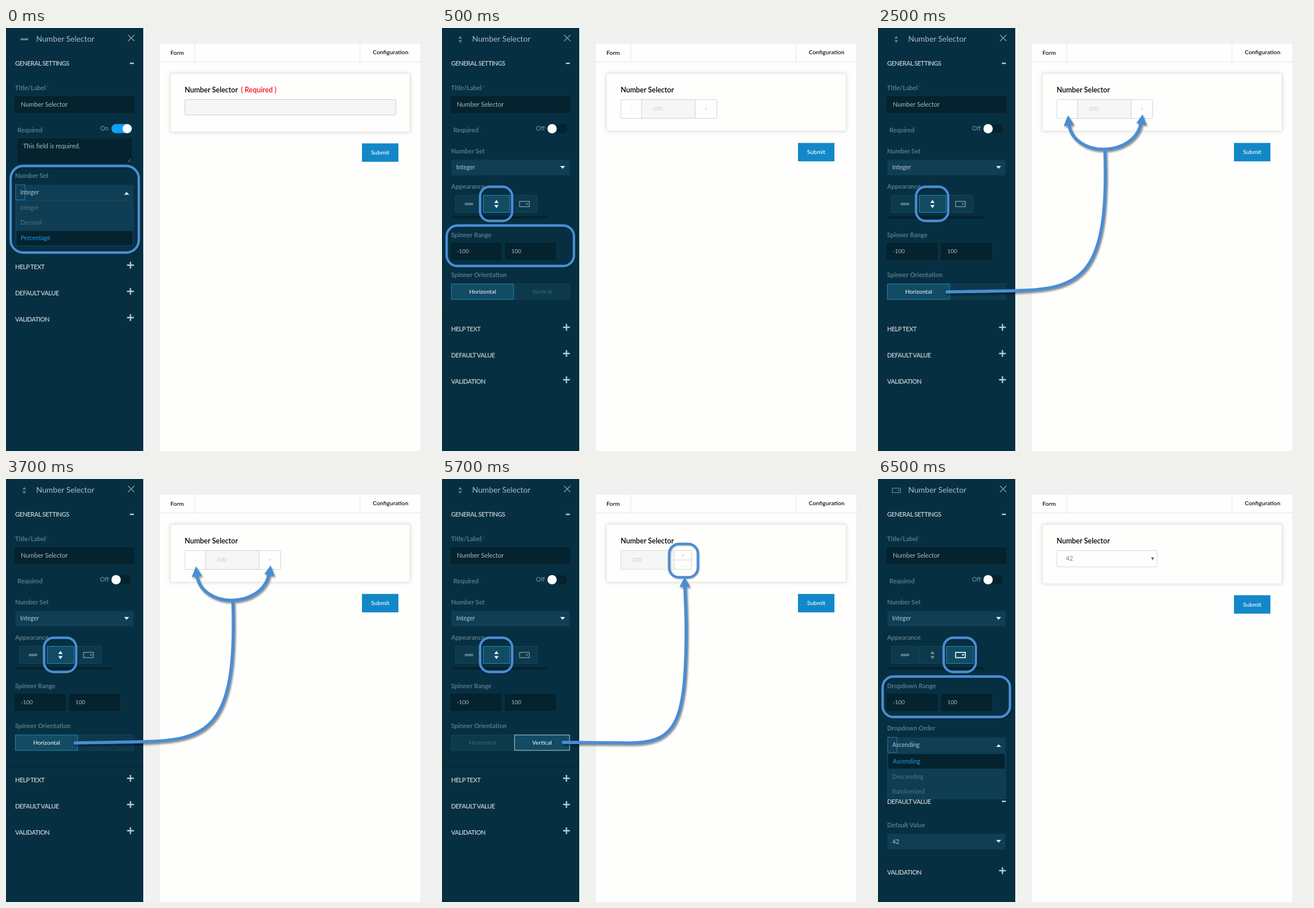
Animation of 755x742 px, one loop 8 s. Source, as an HTML page:

```html
<!DOCTYPE html>
<html lang="en">
<head>
<meta charset="utf-8">
<title>Number selector settings</title>
<style>
html, body { margin: 0; width: 100%; height: 100%; overflow: hidden; background: #f0f2f0; }
svg { display: block; width: 755px; height: 742px; font-family: Lato, "Open Sans", sans-serif; font-size: 10.6px; }
text { white-space: pre; }

/* Scenes: hard cuts at 500, 2500, 4500 and 6500 ms */
.list, .spin, .horiz, .vert, .drop, .range, .path, .later, .early { animation: 8s step-end infinite; visibility: hidden; }
.list { animation-name: list; }
.spin { animation-name: spin; }
.horiz { animation-name: horiz; }
.vert { animation-name: vert; }
.drop { animation-name: drop; }
.range { animation-name: range; }
.path { animation-name: path; }
.later { animation-name: later; }
@keyframes list { 0% { visibility: visible } 6.25%, 100% { visibility: hidden } }
@keyframes spin { 0% { visibility: hidden } 6.25% { visibility: visible } 81.25%, 100% { visibility: hidden } }
@keyframes horiz { 0% { visibility: hidden } 6.25% { visibility: visible } 56.25%, 100% { visibility: hidden } }
@keyframes vert { 0% { visibility: hidden } 56.25% { visibility: visible } 81.25%, 100% { visibility: hidden } }
@keyframes drop { 0% { visibility: hidden } 81.25%, 100% { visibility: visible } }
@keyframes range { 0% { visibility: hidden } 6.25% { visibility: visible } 31.25% { visibility: hidden } 81.25%, 100% { visibility: visible } }
@keyframes path { 0% { visibility: hidden } 31.25% { visibility: visible } 56.25%, 100% { visibility: hidden } }
@keyframes later { 0% { visibility: hidden } 6.25%, 100% { visibility: visible } }

.title { font-size: 13.8px; fill: #a9bcc4; }
.head { font-size: 11px; font-weight: 600; letter-spacing: -.5px; fill: #c3ced3; }
.label { font-size: 11.1px; font-weight: 700; fill: #587987; }
.value { font-size: 11.1px; fill: #a9bac1; }
.num { font-size: 10px; fill: #a9bac1; }
.pick { fill: #b4c7cf; }
.dim { fill: #4d7686; }
.hot { fill: #1b9df3; }
.tab { font-size: 10.3px; fill: #fff; text-anchor: middle; }
.tab.off { fill: #41697a; }
.form { font-size: 10.3px; font-weight: 600; fill: #111; }
.name { font-size: 12.5px; font-weight: 600; fill: #000; }
.submit { font-size: 10.4px; font-weight: 500; fill: #fff; }
.faint { font-size: 9.8px; fill: #c6cccb; }
.mid { text-anchor: middle; }

.field { fill: #04232e; stroke: #031d27; }
.select { fill: #103e54; stroke: #0b364a; }
.cell { fill: #0d394d; stroke: #164459; }
.on { fill: #124b64; stroke: #2686af; }
.rule { stroke: #042532; fill: none; }
.card { fill: #fefefd; stroke: #ebedec; filter: drop-shadow(0 0 3px rgba(0,0,0,.17)); }
.box { fill: #fefefd; stroke: #d3d6d5; }
.grey { fill: #f5f7f6; stroke: #d9dcdb; }
.blue { fill: #1388c8; }
.caret { fill: none; stroke: #2a78ae; }
.mark { fill: none; stroke: #4a8dd5; stroke-width: 4.3; filter: drop-shadow(1.5px 1.5px 1.2px rgba(0,0,0,.3)); }
.flow { fill: none; stroke: #4a8dd5; stroke-width: 5.6; stroke-linecap: round; filter: drop-shadow(2.5px 3px 1.5px rgba(0,0,0,.42)); }
.flow .tip { fill: #4a8dd5; stroke: none; }
</style>
</head>
<body>
<svg viewBox="0 0 755 742">
  <defs>
    <path id="plus" d="M-6 0H6M0-6V6" stroke="#bccbd2" stroke-width="2.3"/>
    <path id="minus" d="M-3.5 0H3.5" stroke="#c3ced3" stroke-width="2.4"/>
    <path id="down" d="M-4.5-2.2H4.5L0 2.6Z"/>
    <path id="up" d="M-4.5 2.4H4.5L0-2.4Z"/>
    <path id="dash" d="M-7.5-2H7.5V2.2H-7.5Z"/>
    <path id="updown" d="M0-7.2L3.9-1.8H-3.9ZM0 7.2L3.9 1.8H-3.9Z"/>
    <g id="menu">
      <rect x="-8.5" y="-4.6" width="17" height="9.2" fill="none" stroke="currentColor" stroke-width="1.6"/>
      <path d="M2-1.3H7L4.5 1.7Z" fill="currentColor"/>
    </g>
    <g id="tail">
      <path class="rule" d="M0 .5H241"/>
      <text class="head" x="16" y="27">HELP TEXT</text><use href="#plus" x="218.5" y="20"/>
      <text class="head" x="16" y="72.7">DEFAULT VALUE</text><use href="#plus" x="218.5" y="66"/>
      <text class="head" x="16" y="118.5">VALIDATION</text><use href="#plus" x="218.5" y="112"/>
    </g>
    <g id="submit">
      <rect class="blue" x="625" width="64" height="32.3"/>
      <text class="submit mid" x="657" y="19.7">Submit</text>
    </g>
  </defs>

  <!-- Form page -->
  <rect width="755" height="742" fill="#f0f2f0"/>
  <path d="M269.5 750V26.5H728.5V750Z" fill="#fefefd" stroke="#e8eae9"/>
  <path d="M270 59.5H728M331.5 27V59M621.5 27V59" stroke="#e2e5e4"/>
  <text class="form" x="288.7" y="46.7">Form</text>
  <text class="form" x="644" y="46.3">Configuration</text>

  <g class="list">
    <rect class="card" x="289" y="80" width="420" height="102"/>
    <rect class="grey" x="314" y="125.5" width="370.5" height="27" rx="2" style="stroke:#c9cdcc"/>
    <text class="name" x="412.5" y="113.3" style="fill:#f01018">( Required )</text>
    <use href="#submit" y="202.4"/>
  </g>

  <g class="spin">
    <rect class="card" x="289" y="80" width="420" height="100.5"/>
    <use href="#submit" y="201.6"/>
  </g>
  <g class="horiz">
    <rect class="box" x="314" y="125.5" width="168.5" height="33" rx="2"/>
    <rect class="grey" x="350.5" y="125.5" width="94" height="33" style="stroke:#cfd3d2"/>
    <text class="faint mid" x="332" y="145.3">-</text>
    <text class="faint" x="367" y="145.3">-100</text>
    <text class="faint mid" x="463.7" y="145.3">+</text>
  </g>
  <g class="vert">
    <rect class="grey" x="314" y="125.5" width="124.5" height="33" rx="2"/>
    <path class="box" d="M407.5 125.5H438.5V158.5H407.5ZM407.5 142H438.5"/>
    <text class="faint" x="330" y="145.3">-100</text>
    <text class="faint mid" x="423" y="137">+</text>
    <text class="faint mid" x="423" y="154.5">-</text>
  </g>

  <g class="drop">
    <rect class="card" x="289" y="80" width="420" height="103.5"/>
    <rect class="box" x="314" y="125.5" width="176" height="28.5" rx="2"/>
    <text x="330" y="143.3" fill="#777b7a">42</text>
    <path d="M479.5 137.3H484.7L482.1 142.7Z" fill="#606463"/>
    <use href="#submit" y="203.9"/>
  </g>
  <text class="name" x="313.7" y="113.3">Number Selector</text>

  <!-- Settings panel -->
  <rect width="241" height="742" fill="#063042"/>
  <text class="title" x="53" y="24.4">Number Selector</text>
  <path d="M214.3 12L225.4 23M225.4 12L214.3 23" stroke="#7f979f" stroke-width="1.5"/>
  <text class="head" x="16" y="66.3">GENERAL SETTINGS</text>
  <use href="#minus" x="221" y="62"/>
  <text class="label" x="16" y="108.8">Title/Label</text>
  <text x="71" y="108" font-size="10" fill="#b5222f">*</text>
  <rect class="field" x="16" y="120.5" width="208.5" height="28" rx="1"/>
  <text class="value" x="26" y="137.6">Number Selector</text>
  <text class="label" x="20" y="182.8">Required</text>

  <g class="list">
    <path d="M25.5 18H39V21.5H25.5Z" fill="#68828d"/>
    <text x="165.5" y="180" font-size="10.8" fill="#7895a1">On</text>
    <rect x="185" y="168.5" width="36" height="16" rx="8" fill="#119ff7"/>
    <circle cx="212.7" cy="176.6" r="8" fill="#fff"/>
    <rect class="field" x="20.5" y="194.5" width="200" height="42"/>
    <text class="value" x="30" y="211.4">This field is required.</text>
    <path d="M213.5 235.5L219 230M217 235.5L219 233.5" stroke="#8ba0a8"/>
    <text class="label" x="16" y="263">Number Set</text>
    <rect class="select" x="16.5" y="275" width="207.5" height="27.5"/>
    <rect class="caret" x="17" y="275" width="16" height="26.5"/>
    <text class="pick" x="25" y="291.8">Integer</text>
    <use href="#up" x="211.8" y="290" fill="#dbe7ec"/>
    <use href="#tail" y="396"/>
    <rect x="17.5" y="303" width="205.5" height="79" fill="#0f3d53" stroke="#174f69"/>
    <text class="dim" x="25" y="319">Integer</text>
    <text class="dim" x="25" y="345">Decimal</text>
    <rect x="18" y="356" width="204.5" height="25.5" fill="#04232f"/>
    <text class="hot" x="26" y="372">Percentage</text>
    <rect class="mark" x="8.2" y="242" width="225" height="152" rx="22"/>
  </g>

  <g class="later">
    <text x="165" y="180" font-size="10.8" fill="#7895a1">Off</text>
    <rect x="184.5" y="168.5" width="35.5" height="16" rx="8" fill="#04232e"/>
    <circle cx="193.3" cy="176.6" r="8.2" fill="#fff"/>
    <text class="label" x="16" y="219.8">Number Set</text>
    <rect class="select" x="16.5" y="231.5" width="207.5" height="27"/>
    <text class="pick" x="25" y="248.3">Integer</text>
    <use href="#down" x="211.8" y="244.3" fill="#dbe7ec"/>
    <text class="label" x="16" y="281.8">Appearance</text>
    <rect x="18" y="330" width="168" height="4.5" rx="2" fill="#04222d"/>
    <rect class="cell" x="23.5" y="293.5" width="47" height="30"/>
    <use href="#dash" x="47.3" y="308.6" fill="#56798a"/>
    <rect class="field" x="16" y="377.5" width="87.5" height="28.5"/>
    <rect class="field" x="111.5" y="377.5" width="87.5" height="28.5"/>
    <text class="num" x="26" y="395.3">-100</text>
    <text class="num" x="121.7" y="395.3">100</text>
  </g>

  <g class="spin">
    <use href="#updown" fill="#68828d" transform="translate(32 20) scale(.82)"/>
    <rect class="cell" x="120.5" y="293.5" width="46.5" height="30"/>
    <use href="#menu" x="144.8" y="308.8" color="#6c8b99"/>
    <rect class="on" x="72.5" y="293.5" width="46.5" height="30"/>
    <use href="#updown" x="95.6" y="308.8" fill="#e4eef2"/>
    <text class="label" x="16" y="366.8">Spinner Range</text>
    <text class="label" x="16" y="437.3">Spinner Orientation</text>
    <use href="#tail" y="505"/>
    <rect class="mark" x="66.8" y="278.5" width="56.5" height="60" rx="17"/>
  </g>

  <g class="horiz">
    <rect class="cell" x="127.5" y="449" width="96.5" height="27"/>
    <rect class="on" x="16.5" y="449" width="109" height="27"/>
    <text class="tab" x="71.3" y="466">Horizontal</text>
    <text class="tab off" x="175.7" y="466">Vertical</text>
  </g>
  <g class="vert">
    <rect class="cell" x="16.5" y="449" width="109" height="27"/>
    <rect class="on" x="127.5" y="449" width="96.5" height="27" style="stroke:#b9d4df"/>
    <text class="tab off" x="71.3" y="466">Horizontal</text>
    <text class="tab" x="175.7" y="466">Vertical</text>
  </g>

  <g class="drop">
    <use href="#menu" color="#68828d" transform="translate(32.3 20) scale(.84)"/>
    <rect class="cell" x="72.5" y="293.5" width="46.5" height="30"/>
    <use href="#updown" x="95.6" y="308.8" fill="#6c8b99"/>
    <rect class="on" x="120.5" y="293.5" width="46.5" height="30"/>
    <use href="#menu" x="144.8" y="308.8" color="#fff"/>
    <text class="label" x="16" y="366.8">Dropdown Range</text>
    <text class="label" x="16" y="441">Dropdown Order</text>
    <path class="rule" d="M0 497.5H241M0 666.5H241"/>
    <rect class="select" x="16.5" y="453" width="207.5" height="27.5"/>
    <rect class="caret" x="17" y="453" width="16" height="26.5"/>
    <text class="pick" x="25" y="470">Ascending</text>
    <use href="#up" x="211.8" y="467.7" fill="#dbe7ec"/>
    <rect x="16.5" y="481" width="207.5" height="80" fill="#0f3d53" stroke="#12455c"/>
    <rect x="18" y="482.5" width="204.5" height="25.5" fill="#04232f"/>
    <text class="hot" x="26" y="499">Ascending</text>
    <text class="dim" x="25" y="526">Descending</text>
    <text class="dim" x="25" y="552">Randomized</text>
    <text class="head" x="16" y="570">DEFAULT VALUE</text>
    <use href="#minus" x="221" y="565.5"/>
    <text class="label" x="16" y="610.8">Default Value</text>
    <rect class="select" x="16.5" y="622.5" width="207.5" height="27"/>
    <text class="pick" x="25" y="639.5">42</text>
    <use href="#down" x="211.8" y="635.3" fill="#dbe7ec"/>
    <text class="head" x="16" y="693.5">VALIDATION</text>
    <use href="#plus" x="218.5" y="687"/>
    <rect class="mark" x="115.3" y="278.5" width="56.5" height="60" rx="17"/>
  </g>

  <!-- Callouts -->
  <rect class="mark range" x="8.2" y="346.5" width="223.5" height="71" rx="19"/>
  <g class="flow path">
    <path d="M121.5 463L235 461C355 459 406 440 398.5 216M335 168C343 228 450 228 462 166"/>
    <path class="tip" d="M333.5 153L344 169.5L326 172ZM464.5 151.5L471.5 170L453.5 167Z"/>
  </g>
  <rect class="mark vert" x="398.8" y="114" width="50.5" height="58.5" rx="17"/>
  <g class="flow vert">
    <path d="M213 462C250 462 290 463 330 463C412 463 428 425 428.7 270C429 240 427 210 426.5 186"/>
    <path class="tip" d="M425.8 172L435.5 188.5L417 189.5Z"/>
  </g>
</svg>
</body>
</html>
```
